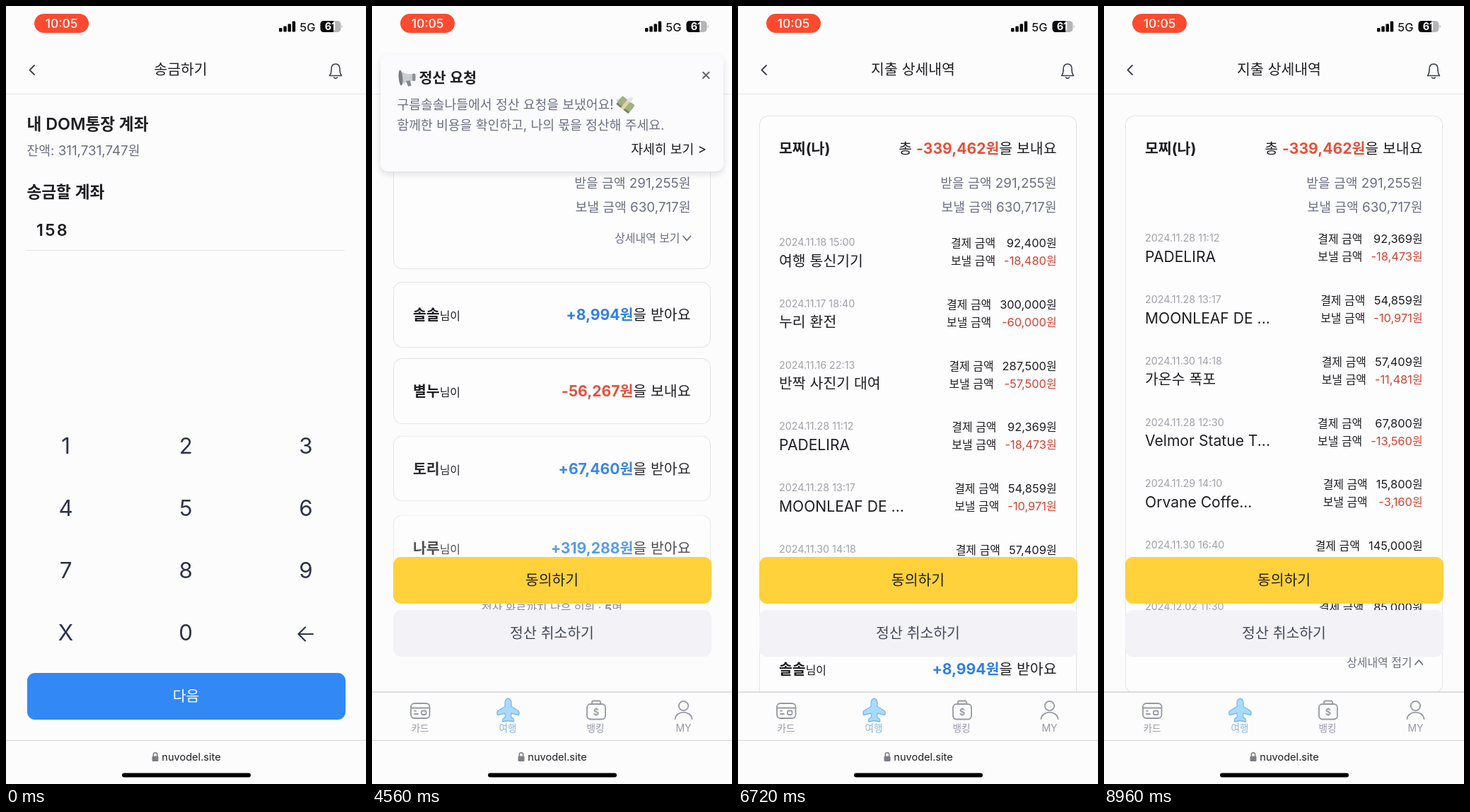
An HTML page that plays this animation: 509 by 1100 pixels, repeating every 9.04 s.

```html
<!DOCTYPE html>
<html lang="ko">
<head>
<meta charset="utf-8">
<title>송금 · 정산</title>
<style>
  * { box-sizing: border-box; margin: 0; }
  html, body { width: 100%; height: 100%; overflow: hidden; }
  body {
    position: relative; background: #fcfcfd; color: #1e1e22;
    font: 400 21.1px/1 Inter, "Noto Sans CJK KR", sans-serif;
  }
  i { font: normal .97em/0 "Noto Sans CJK KR", sans-serif; font-weight: inherit; }
  b { font-weight: 700; }
  svg { position: absolute; left: 0; top: 0; overflow: visible; }
  .layer { position: absolute; inset: 0; }

  /* text placed by its vertical middle */
  .t {
    position: absolute; left: calc(var(--x) * 1px); top: calc(var(--y) * 1px);
    white-space: nowrap; transform: translateY(-50%);
  }
  .c { transform: translate(-50%, -50%); }
  .r { transform: translate(-100%, -50%); }
  .semi { font-weight: 600; }
  .h { font-size: 23.3px; font-weight: 600; }
  .m { font-size: 18.8px; }
  .s { font-size: 16.4px; }
  .xs { font-size: 14.3px; }
  .grey { color: #6b6f80; }
  .red { color: #e5503b; }
  .blue { color: #2f7fe2; }
  .key { font-size: 31.3px; color: #2d3446; }
  .num { font-size: 23.4px; letter-spacing: 2.3px; }
  .rule { position: absolute; height: 1px; background: #e2e2e6; }
  .btn {
    position: absolute; left: 29.5px; width: 450px; height: 66px; border-radius: 11px;
    display: flex; align-items: center; justify-content: center;
  }

  .send, .settle, .typed, .more, .less, .toast, .enter, .fold, .rows, .scroll, .pill {
    animation: 9040ms linear infinite both;
  }
  .send { animation-name: early; animation-timing-function: step-end; }
  .settle { animation-name: late; animation-timing-function: step-end; }
  @keyframes early { 0% { visibility: visible } 38.05%, 100% { visibility: hidden } }
  @keyframes late { 0% { visibility: hidden } 38.05%, 100% { visibility: visible } }

  .typed { animation-name: typed; animation-timing-function: step-end; }
  @keyframes typed { 0% { opacity: 0 } 5.31%, 100% { opacity: 1 } }

  .more { animation-name: more; animation-timing-function: step-end; }
  .less { animation-name: less; animation-timing-function: step-end; }
  @keyframes more { 0% { opacity: 1 } 67.88%, 100% { opacity: 0 } }
  @keyframes less { 0% { opacity: 0 } 67.88%, 100% { opacity: 1 } }

  .pill {
    position: absolute; left: 39.7px; top: 10.7px; width: 77.6px; height: 27.6px;
    border-radius: 14px; background: #ff4a2f; animation-name: pulse;
    animation-timing-function: ease-in-out;
  }
  @keyframes pulse {
    0%, 12%, 28%, 44%, 52%, 66%, 74%, 90%, 100% { background: #ff4a2f }
    20.4%, 36%, 59% { background: #ec432a }
    82% { background: #f1472d }
  }

  .toast {
    position: absolute; left: 12px; top: 69px; width: 485px; height: 165px;
    border-radius: 11px; background: #fbfbfe; box-shadow: 0 4px 9px rgba(30, 30, 50, .13);
    animation-name: toast;
  }
  @keyframes toast {
    0%, 14.38% { opacity: 0; transform: translateY(-40px); animation-timing-function: ease-out }
    17.7%, 57.52% { opacity: 1; transform: none; animation-timing-function: ease-in }
    60.84%, 100% { opacity: 0; transform: translateY(-40px) }
  }

  .enter { animation-name: enter; animation-delay: calc(var(--i, 0) * 80ms); }
  @keyframes enter {
    0%, 44.25% { opacity: 0; transform: translateY(26px); animation-timing-function: ease-out }
    48.67%, 100% { opacity: 1; transform: none }
  }

  .stack { position: absolute; left: 30px; top: 155px; width: 449px; }
  .card {
    position: relative; height: 93px; margin-bottom: 15px; border-radius: 13px;
    background: #fdfdfe; box-shadow: inset 0 0 0 1px #e4e4e8;
  }
  .card.main { height: auto; margin-bottom: 18px; padding-top: 155px; }
  .foot { position: relative; height: 62px; }
  .left { position: relative; height: 48px; line-height: 48px; text-align: center; }

  .fold { display: flow-root; overflow: hidden; animation-name: fold; }
  @keyframes fold {
    0% { height: 0 }
    67.88% {
      height: 0;
      animation-timing-function: linear(0, .09 5%, .264 10%, .442 15%, .594 20%, .713 25%,
        .801 30%, .864 35%, .908 40%, .96 50%, .983 60%, .993 70%, .997 80%, 1);
    }
    87.64%, 100% { height: 600px }
  }
  .rows {
    position: relative; margin-top: 12px; height: 580px; overflow: hidden;
    animation-name: fade;
  }
  @keyframes fade {
    0%, 67.88% { opacity: 0; animation-timing-function: ease-in-out }
    71.19%, 100% { opacity: 1 }
  }
  .scroll { animation-name: scroll; }
  @keyframes scroll {
    0%, 79.87% { transform: none }
    82.3% { transform: translateY(-38.5px) }
    92.04% { transform: translateY(-195px) }
    96.24%, 100% { transform: translateY(-266px) }
  }
  .row { position: relative; height: 86.75px; }
  .date { color: #a0a1aa; }
  .sums {
    position: absolute; right: 28.5px; top: 1px; display: grid; white-space: nowrap;
    grid-template-columns: auto auto; column-gap: 12px; text-align: right; line-height: 25px;
  }
  .sums .red { color: #cf4434; }

  .header { position: absolute; left: 0; top: 0; width: 100%; height: 125px; border-bottom: 1px solid #e6e6e9; }
  .tabs {
    position: absolute; left: 0; top: 969px; width: 100%; height: 70px;
    background: #fcfcfd; border-top: 2px solid #dddde0; color: #9698a4;
  }
  .tabs .t { font-size: 14px; }
  .browser {
    position: absolute; left: 0; top: 1038px; width: 100%; height: 62px;
    background: #fcfcfd; border-top: 1px solid #d3d3d7;
  }
  .line { fill: none; stroke-width: 1.8; stroke-linecap: round; stroke-linejoin: round; }
</style>
</head>
<body>

<div class="layer send">
  <p class="t c" style="--x:247;--y:90">송금하기</p>
  <p class="t h" style="--x:29.5;--y:167">내 DOM통장 계좌</p>
  <p class="t m grey" style="--x:29.5;--y:205">잔액: 311,731,747원</p>
  <p class="t h" style="--x:29.5;--y:263">송금할 계좌</p>
  <p class="t semi num" style="--x:43;--y:317">158<span class="typed">9</span></p>
  <div class="rule" style="left:30px;top:345px;width:449px"></div>
  <div id="keys"></div>
  <svg width="509" height="1100"><path class="line" style="stroke:#2d3446;stroke-width:2.2" d="M434 888H414M423 878.5L413.5 888L423 897.5"/></svg>
  <div class="btn" style="top:943px;background:#3288f4;color:#fff">다음</div>
</div>

<div class="layer settle">
  <p class="t c" style="--x:247.5;--y:90">지출 상세내역</p>
  <div class="stack">
    <div class="card main enter">
      <p class="t" style="--x:28;--y:47"><b>모찌(나)</b></p>
      <p class="t r" style="--x:420.5;--y:47">총 <b class="red">-339,462원</b>을 보내요</p>
      <p class="t r m grey" style="--x:420.5;--y:95.5">받을 금액 291,255원</p>
      <p class="t r m grey" style="--x:420.5;--y:129.5">보낼 금액 630,717원</p>
      <div class="fold"><div class="rows"><div class="scroll" id="rows"></div></div></div>
      <div class="foot s grey">
        <div class="more">
          <p class="t r" style="--x:405.5;--y:18">상세내역 보기</p>
          <svg width="449" height="62"><path class="line" stroke="#6b6f80" d="M410 15.5L415.2 21.5L420.4 15.5"/></svg>
        </div>
        <div class="less">
          <p class="t r" style="--x:405.5;--y:18">상세내역 접기</p>
          <svg width="449" height="62"><path class="line" stroke="#6b6f80" d="M410 21L415.2 15L420.4 21"/></svg>
        </div>
      </div>
    </div>
    <div id="people"></div>
    <p class="left s grey enter" style="--i:4">정산 완료까지 남은 인원 : <b>5</b>명</p>
  </div>
  <div class="layer enter">
    <div class="btn" style="top:779px;background:#ffd13b">동의하기</div>
    <div class="btn" style="top:854px;background:#f2f2f7;color:#464b5a">정산 취소하기</div>
  </div>
  <div class="tabs">
    <svg width="509" height="70" viewBox="0 969 509 70" style="top:-2px">
      <g class="line" stroke="#9698a4">
        <rect x="55" y="986" width="26.5" height="21" rx="5"/>
        <path d="M55.5 992.5H81M60 1001H65M60 996.7H62"/>
        <rect x="70" y="996.5" width="6.5" height="5.5" rx="1.5"/>
        <rect x="304" y="987" width="26" height="21.5" rx="5"/>
        <path d="M311 986.5V984.5Q311 982.5 313 982.5H321Q323 982.5 323 984.5V986.5"/>
        <circle cx="440.5" cy="989.5" r="6.7"/>
        <path d="M428.5 1008C430 995.5 451 995.5 452.5 1008"/>
      </g>
      <path d="M192.5 979Q197 980 197 986V990.5L207 996.5Q209 999 207.5 1002.5L197 1000L196.5 1005L200.500 1008.500V1012L192.5 1010.5L184.5 1012V1008.5L188.5 1005L188 1000L177.5 1002.5Q176 999 178 996.5L188 990.5V986Q188 980 192.5 979Z" fill="#a8dbfb" stroke="#7fb9e6" stroke-width="1.3" stroke-linejoin="round"/>
    </svg>
    <p class="t c semi" style="--x:317;--y:27;font-size:13px">$</p>
    <p class="t c" style="--x:68;--y:50">카드</p>
    <p class="t c" style="--x:192;--y:50;color:#8ab6e2">여행</p>
    <p class="t c" style="--x:316;--y:50">뱅킹</p>
    <p class="t c" style="--x:440.5;--y:50">MY</p>
  </div>
</div>

<div class="header">
  <svg width="509" height="124">
    <g class="line" stroke="#3b3f4a">
      <path d="M40 84L33.5 90.5L40 97"/>
      <path d="M457.5 98.5Q460 95.5 460 89.5Q460 82 466 82Q472 82 472 89.5Q472 95.5 474.5 98.5ZM463.5 101Q466 103.5 468.5 101" stroke-width="1.6"/>
    </g>
  </svg>
</div>

<div class="toast">
  <svg width="485" height="165" viewBox="12 69 485 165">
    <path d="M44 98L58 96.5L60.5 105L46 107Z" fill="#a9acb2"/>
    <path d="M39 91Q47 97 57 96.5L58.5 105Q49 105.5 41 112Z" fill="#c9ccd1"/>
    <path d="M48 106L54 105.5L55.5 113L51 113.5Z" fill="#85888f"/>
    <ellipse cx="40.5" cy="101.5" rx="2.8" ry="11" fill="#777b83" transform="rotate(-5 40.5 101.5)"/>
    <rect x="57" y="95.5" width="4.5" height="10.5" rx="1.5" fill="#8c9097"/>
    <path d="M347 138L345.5 132L354 130L359 136ZM361 140L370 143L366 148.5L359 146Z" fill="#d3d9dd"/>
    <g transform="rotate(38 358 140)">
      <rect x="347" y="134" width="22" height="13" rx="1" fill="#77855f"/>
      <rect x="347" y="132" width="22" height="12" rx="1" fill="#a3b184"/>
      <rect x="355.5" y="132" width="5" height="15" fill="#e5d3a2"/>
    </g>
    <path d="M360 133Q364 128 370 130L365 137Z" fill="#e0e4e7"/>
    <path class="line" stroke="#55585f" stroke-width="1.5" d="M468 93.7L476.5 102.2M476.5 93.7L468 102.2"/>
  </svg>
  <p class="t semi" style="--x:54.5;--y:33;font-size:21.3px">정산 요청</p>
  <p class="t m grey" style="--x:23.5;--y:71">구름솔솔나들에서 정산 요청을 보냈어요!</p>
  <p class="t m grey" style="--x:23.5;--y:99.5">함께한 비용을 확인하고, 나의 몫을 정산해 주세요.</p>
  <p class="t r m" style="--x:461;--y:133.5">자세히 보기 &gt;</p>
</div>

<div class="pill"></div>
<p class="t c" style="--x:78.5;--y:25;font-size:17.5px;font-weight:500;color:#fff">10:05</p>
<svg width="509" height="60">
  <g fill="#0b0b0d">
    <rect x="386" y="31" width="4.5" height="5.5" rx="1.3"/>
    <rect x="392.3" y="28.5" width="4.5" height="8" rx="1.3"/>
    <rect x="398.5" y="25.3" width="4.5" height="11.2" rx="1.3"/>
    <rect x="404.7" y="21.5" width="4.5" height="15" rx="1.3"/>
  </g>
  <rect x="444.5" y="21" width="29" height="16" rx="5" fill="#b5b5b8"/>
  <path d="M449.5 21H463V37H449.5Q444.5 37 444.5 32V26Q444.5 21 449.5 21Z" fill="#0b0b0d"/>
  <path d="M474.7 26.5Q477 29 474.7 31.5Z" fill="#b5b5b8"/>
</svg>
<p class="t c" style="--x:426.5;--y:29.5;font-size:16.5px;font-weight:500">5G</p>
<p class="t c" style="--x:458.5;--y:29.3;font-size:14.5px;color:#fff"><b>61</b></p>

<div class="browser">
  <svg width="509" height="62">
    <rect x="206.5" y="21.5" width="9" height="7.5" rx="1.5" fill="#7d7e85"/>
    <path d="M208.3 22V19.5Q208.3 16.8 211 16.8T213.7 19.5V22" fill="none" stroke="#7d7e85" stroke-width="1.5"/>
    <rect x="164" y="45.5" width="182" height="6" rx="3" fill="#000"/>
  </svg>
  <p class="t c" style="--x:262;--y:23;font-size:14.6px">nuvodel.site</p>
</div>

<script>
  const fill = (id, items, draw) => {
    document.getElementById(id).innerHTML = items.map(draw).join("");
  };

  fill("keys", [..."123456789X0"], (k, n) =>
    `<p class="t c key" style="--x:${84.5 + n % 3 * 169.7};--y:${623 + Math.floor(n / 3) * 88}">${k}</p>`);

  fill("people", [["솔솔", "+8,994"], ["별누", "-56,267"], ["토리", "+67,460"], ["나루", "+319,288"]],
    ([name, sum], n) => {
      const [tone, verb] = sum[0] === "+" ? ["blue", "받아요"] : ["red", "보내요"];
      return `<div class="card enter" style="--i:${n + 1}">
        <p class="t" style="--x:28;--y:47"><b>${name}</b><span class="s">님이</span></p>
        <p class="t r" style="--x:420.5;--y:47"><b class="${tone}">${sum}원</b>을 ${verb}</p></div>`;
    });

  fill("rows", [
    ["11.18 15:00", "여행 통신기기", "92,400", "18,480"],
    ["11.17 18:40", "누리 환전", "300,000", "60,000"],
    ["11.16 22:13", "반짝 사진기 대여", "287,500", "57,500"],
    ["11.28 11:12", "PADELIRA", "92,369", "18,473"],
    ["11.28 13:17", "MOONLEAF DE ...", "54,859", "10,971"],
    ["11.30 14:18", "가온수 폭포", "57,409", "11,481"],
    ["11.28 12:30", "Velmor Statue T...", "67,800", "13,560"],
    ["11.29 14:10", "Orvane Coffe...", "15,800", "3,160"],
    ["11.30 16:40", "Corovenda Co...", "145,000", "29,000"],
    ["12.02 11:30", "Lumora Market...", "85,000", "17,000"]
  ], ([date, name, paid, owed]) => `<div class="row">
      <p class="t xs date" style="--x:28;--y:12">2024.${date}</p>
      <p class="t" style="--x:28;--y:38.7">${name}</p>
      <div class="sums s"><span>결제 금액</span><span>${paid}원</span>
      <span>보낼 금액</span><span class="red">-${owed}원</span></div></div>`);

  // Hangul runs get their own slightly smaller face
  const walker = document.createTreeWalker(document.body, NodeFilter.SHOW_TEXT);
  const texts = [];
  while (walker.nextNode()) {
    const node = walker.currentNode;
    if (node.parentNode.tagName !== "SCRIPT" && /[가-힣]/.test(node.data)) texts.push(node);
  }
  for (const node of texts) {
    const span = document.createElement("span");
    span.innerHTML = node.data.replace(/&/g, "&amp;").replace(/</g, "&lt;")
      .replace(/[가-힣]+/g, "<i>$&</i>");
    node.replaceWith(span);
  }
</script>
</body>
</html>
```
